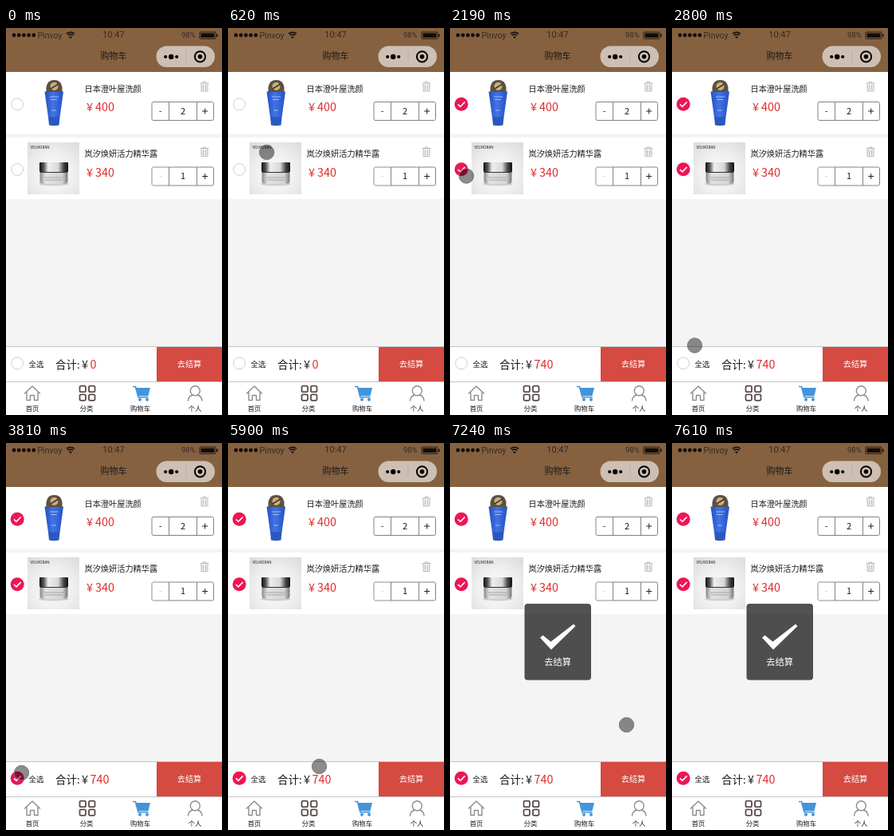
These frames come from a looping animation (271x484 px, 8 s). An HTML page:

```html
<!DOCTYPE html>
<html lang="zh-CN">
<head>
<meta charset="utf-8">
<title>购物车</title>
<style>
  html, body { margin: 0; width: 100%; height: 100%; overflow: hidden; background: #f4f4f4; }
  svg { display: block; width: 100vw; height: 100vh; }
  text { font-family: "Noto Sans CJK SC", "Noto Sans CJK", sans-serif; fill: #1c1c1c; }
  .mid { text-anchor: middle; }
  .status { font-family: Roboto, Arial, sans-serif; fill: #352a22; }
  .name { font-size: 10.2px; }
  .price { font-size: 14.4px; }
  .red { fill: #e12b2b; }
  .count { font-size: 11px; }
  .tab { font-size: 8.4px; font-weight: 500; }
  .line { fill: none; stroke: #8c8c8c; stroke-width: 1.4; stroke-linejoin: round; stroke-linecap: round; }
</style>
</head>
<body>
<svg viewBox="0 0 271 484">
  <defs>
    <radialGradient id="backdrop" cy=".6" r=".75">
      <stop offset="0" stop-color="#fcfcfc"/><stop offset=".5" stop-color="#f0f0f0"/><stop offset="1" stop-color="#dcdcdc"/>
    </radialGradient>
    <linearGradient id="silver">
      <stop offset="0" stop-color="#111"/><stop offset=".15" stop-color="#555"/><stop offset=".3" stop-color="#eee"/>
      <stop offset=".65" stop-color="#d8d8d8"/><stop offset=".85" stop-color="#444"/><stop offset="1" stop-color="#111"/>
    </linearGradient>
    <linearGradient id="glass">
      <stop offset="0" stop-color="#888"/><stop offset=".2" stop-color="#e2e2e0"/>
      <stop offset=".8" stop-color="#d4d4d2"/><stop offset="1" stop-color="#777"/>
    </linearGradient>
    <linearGradient id="tube">
      <stop offset="0" stop-color="#2450c4"/><stop offset=".45" stop-color="#4274e4"/><stop offset="1" stop-color="#2450c4"/>
    </linearGradient>
    <circle id="box" r="7.4" fill="#fff" stroke="#cfcfcf"/>
    <g id="tick">
      <circle r="8.5" fill="#ee1556"/>
      <path d="M-4.2 .2L-1.2 3.1L4.5 -2.8" fill="none" stroke="#fff" stroke-width="1.7"/>
    </g>
    <g id="trash" fill="none" stroke="#bdbdbd">
      <path d="M-4 -4V5.5H4V-4" fill="#ececec"/>
      <path d="M-5.5 -4.5H5.5M-2 -4.5V-6H2V-4.5M-1.5 -2V4M1.5 -2V4"/>
    </g>
    <path id="stepper" d="M185 0H258.5Q260.5 0 260.5 2V21Q260.5 23 258.5 23H185Q183 23 183 21V2Q183 0 185 0ZM204.5 0V23M239.5 0V23" fill="#fff" stroke="#858080"/>
  </defs>

  <rect width="271" height="484" fill="#f4f4f4"/>

  <!-- header -->
  <rect width="271" height="55" fill="#856140"/>
  <g fill="#120d0a">
    <circle cx="10" cy="9" r="2.4"/><circle cx="16.2" cy="9" r="2.4"/><circle cx="22.4" cy="9" r="2.4"/>
    <circle cx="28.6" cy="9" r="2.4"/><circle cx="34.8" cy="9" r="2.4"/>
    <path d="M79 11L81 13.2L83 11Q81 9.8 79 11Z"/>
    <path d="M77.6 9.2Q81 6.6 84.4 9.2M76 7.2Q81 3.2 86 7.2" fill="none" stroke="#120d0a" stroke-width="1.5"/>
    <rect x="244.5" y="6.5" width="17" height="5.5"/><rect x="264" y="7.5" width="1.5" height="3.5"/>
    <rect x="243" y="5" width="20" height="8.5" rx="1" fill="none" stroke="#120d0a" stroke-width=".8"/>
  </g>
  <text class="status" x="39.5" y="12.7" font-size="10.5">Pinvoy</text>
  <text class="status mid" x="135" y="12.3" font-size="11">10:47</text>
  <text class="status" x="220" y="12.3" font-size="9.5">98%</text>
  <text class="mid" x="135" y="39" font-size="11">购物车</text>
  <rect x="188.5" y="22.5" width="73.5" height="26.5" rx="13.2" fill="#cdbfb3"/>
  <path d="M226 28V43" stroke="#b9aa9d" stroke-width=".7"/>
  <circle cx="200.2" cy="36" r="2.1"/><circle cx="207.2" cy="36" r="3.2"/><circle cx="214.2" cy="36" r="2.1"/>
  <circle cx="243.5" cy="35.8" r="6.6" fill="none" stroke="#000" stroke-width="2"/><circle cx="243.5" cy="35.8" r="2.8"/>

  <!-- first item -->
  <rect y="55" width="271" height="77.5" fill="#fff"/>
  <use href="#box" x="14.2" y="95.5"/>
  <path d="M48.5 79.5H72L67.5 112H53Z" fill="url(#tube)"/>
  <path d="M53 111.5H67.5L66.5 121.5Q60 122.8 54 121.5Z" fill="#2b57c0"/>
  <path d="M50.5 80V74Q52 65 60.5 65Q69 65 70.5 74V80Z" fill="#5c5040"/>
  <circle cx="60.5" cy="73" r="5" fill="#c8b182"/><path d="M56 76L66 70" stroke="#40372d" stroke-width="1.5"/>
  <path d="M55 86H66M56 89.5H64M57 103H63" stroke="#a9c4fa" stroke-width=".9"/>
  <text class="name" x="98.5" y="79.7">日本澄叶屋洗颜</text>
  <text class="price red" x="101" y="104">¥</text><text class="price red" x="112" y="104">400</text>
  <use href="#trash" x="249" y="73.5"/>
  <use href="#stepper" y="92.5"/>
  <text class="count mid" x="193.7" y="107.8">-</text>
  <text class="count mid" x="222" y="107.8">2</text>
  <path d="M246.2 104H253.2M249.7 100.5V107.5" stroke="#222"/>

  <!-- second item -->
  <rect y="137" width="271" height="77" fill="#fff"/>
  <use href="#box" x="14.2" y="177"/>
  <rect x="27" y="143" width="65" height="65" fill="url(#backdrop)"/>
  <text x="30.5" y="151" font-size="4.6">VELMORAN</text>
  <ellipse cx="60" cy="195" rx="19" ry="2.5" fill="#cfcfcf"/>
  <path d="M42.5 180H77.5V191Q77.5 195 73 195H47Q42.5 195 42.5 191Z" fill="url(#glass)"/>
  <path d="M48 187H72M49 190H71" stroke="#999" stroke-width=".8"/>
  <rect x="42" y="168" width="36" height="12" rx="1" fill="url(#silver)"/>
  <path d="M43 180.5H77" stroke="#333"/>
  <text class="name" x="98.5" y="161.2">岚汐焕妍活力精华露</text>
  <text class="price red" x="101" y="185.5">¥</text><text class="price red" x="112" y="185.5">340</text>
  <use href="#trash" x="249" y="155"/>
  <use href="#stepper" y="174"/>
  <path d="M204 174H185Q183 174 183 176V195Q183 197 185 197H204" fill="none" stroke="#d0cccc"/>
  <text class="count mid" x="193.7" y="189.3" style="fill:#c8c8c8">-</text>
  <text class="count mid" x="222" y="189.3">1</text>
  <path d="M246.2 185.5H253.2M249.7 182V189" stroke="#222"/>

  <!-- summary bar -->
  <rect y="398" width="271" height="86" fill="#fff"/>
  <path d="M0 398.5H271M0 442.5H271" stroke="#c4c4c4"/>
  <use href="#box" x="14.2" y="419.3"/>
  <text x="28.5" y="424" font-size="9.4" font-weight="500">全选</text>
  <text x="62" y="426" font-size="13.5">合计:</text>
  <text class="price" x="95" y="426">¥</text>
  <text class="price red" id="total" x="105.5" y="426"></text>
  <rect x="189" y="399" width="82" height="43" fill="#d54a41"/>
  <text class="mid" x="230" y="424.2" font-size="10.2" font-weight="500" style="fill:#fff">去结算</text>

  <!-- tab bar -->
  <path class="line" d="M23.5 457L33 448L42.5 457M26 455.5V465.5H30.5V459.5H35.5V465.5H40V455.5"/>
  <g fill="none" stroke="#5c4c4c" stroke-width="1.8">
    <rect x="92.5" y="447.7" width="7.5" height="7.5" rx="1.8"/><rect x="104" y="447.7" width="7.5" height="7.5" rx="1.8"/>
    <rect x="92.5" y="458.3" width="7.5" height="7.5" rx="1.8"/><rect x="104" y="458.3" width="7.5" height="7.5" rx="1.8"/>
  </g>
  <g fill="#4394d9">
    <path d="M162.5 450H181L178.5 460H165.5Z"/>
    <circle cx="168" cy="464.7" r="2"/><circle cx="177" cy="464.7" r="2"/>
    <path d="M159 448.5H162.5L166 461.7H178.5" fill="none" stroke="#4394d9" stroke-width="1.7"/>
  </g>
  <circle class="line" cx="237.3" cy="453.7" r="6"/>
  <path class="line" d="M228.5 466Q229 460.5 234 459M240.5 459Q245.5 460.5 246 466"/>
  <text class="tab mid" x="33" y="478.5">首页</text>
  <text class="tab mid" x="101" y="478.5">分类</text>
  <text class="tab mid" x="168.5" y="478.5">购物车</text>
  <text class="tab mid" x="237" y="478.5">个人</text>

  <!-- timed parts -->
  <use href="#tick" x="14.2" y="95.3" data-from="1510"/>
  <use href="#tick" x="14.2" y="176.8" data-from="2190"/>
  <use href="#tick" x="14.2" y="419.2" data-from="3490"/>
  <g data-from="6610">
    <rect x="93.5" y="201" width="83.5" height="95.5" rx="4" fill="#000" fill-opacity=".68"/>
    <path d="M113 243.5L116.5 240.5L126.5 248.5L155 226.5L157.5 229L127 258.5Z" fill="#fff"/>
    <text class="mid" x="135.2" y="278" font-size="11.3" style="fill:#fff">去结算</text>
  </g>
  <circle id="cursor" r="9.2" fill="#000" fill-opacity=".45" stroke="#787676" stroke-opacity=".9"/>
</svg>
<script>
const LOOP = 8000, START = 70, TICK = 77.6, LAST_TICK = 97;

// pointer path: [tick, x, y]
const path = [
  [0, 218, 478], [4, 105, 240], [9, 11, 99], [12, 11, 99], [13, 13, 98], [14, 16, 97],
  [15, 16, 97], [16, 15.5, 101], [17, 15.5, 110.5], [18, 15.5, 110.5], [21, 21, 180],
  [23, 21, 180], [24, 20.5, 183], [25, 20.5, 185], [31, 20.5, 185], [32, 21, 210],
  [35, 28.5, 397], [38, 24, 415], [42, 21, 420], [47, 21, 420], [48, 19.5, 412.5],
  [74, 19.5, 412.5], [75, 114.5, 404.5], [76, 212, 415], [77, 212, 415], [78, 214, 417],
  [82, 227, 420.5], [87, 227, 420.5], [88, 216, 418], [89, 216, 418], [90, 218, 405],
  [94, 225, 300], [97, 281, 220]
];

const cursor = document.getElementById('cursor');
const total = document.getElementById('total');
const timed = document.querySelectorAll('[data-from]');

function pointAt(tick) {
  const i = Math.max(1, path.findIndex(key => key[0] >= tick));
  const [t0, x0, y0] = path[i - 1], [t1, x1, y1] = path[i];
  const k = (tick - t0) / (t1 - t0);
  return [x0 + (x1 - x0) * k, y0 + (y1 - y0) * k];
}

function draw(time) {
  const t = time % LOOP;
  for (const part of timed) part.style.display = t >= part.dataset.from ? '' : 'none';
  total.textContent = t < 1510 ? 0 : t < 2190 ? 400 : 740;

  const tick = Math.floor((t - START) / TICK);
  const visible = tick >= 0 && tick < LAST_TICK;
  cursor.style.display = visible ? '' : 'none';
  if (visible) cursor.setAttribute('transform', `translate(${pointAt(tick)})`);
}

const begin = performance.now();
(function frame() {
  draw(performance.now() - begin);
  requestAnimationFrame(frame);
})();
</script>
</body>
</html>
```
